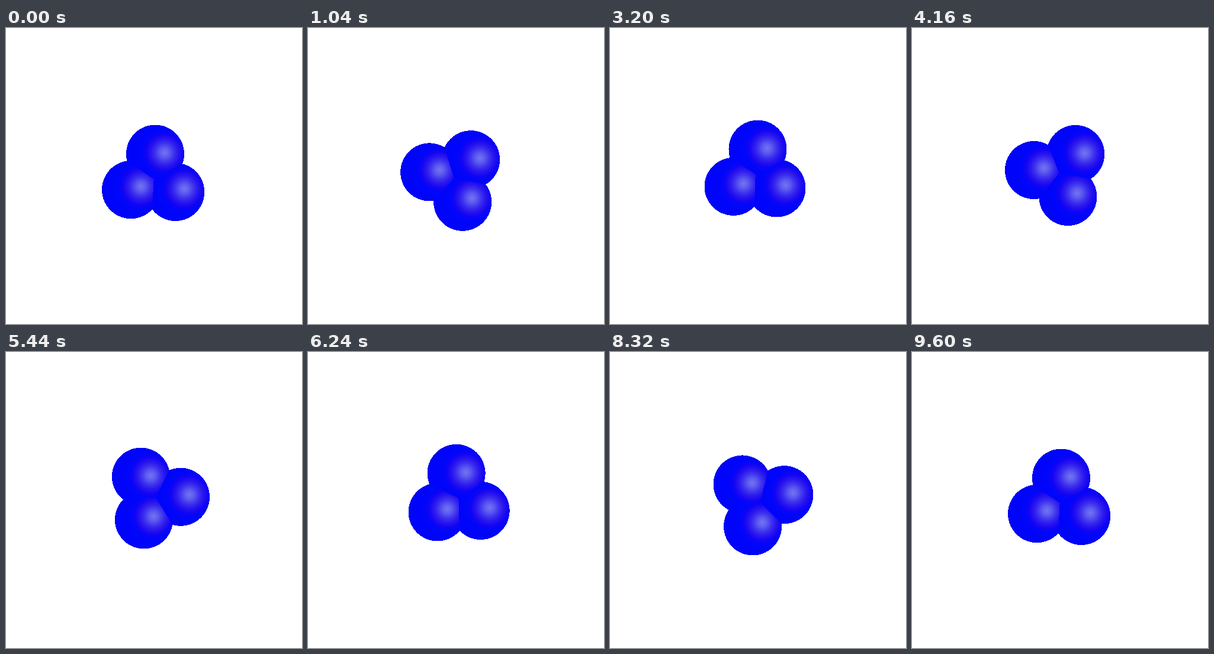
Recreate the animation shown at these times as an HTML page with a canvas. Size 500 by 500 pixels, loop 9.68 s.

```html
<!DOCTYPE html>
<html lang="en">
<head>
<meta charset="utf-8">
<title>Rotating spheres</title>
<style>
  html, body { margin: 0; height: 100%; overflow: hidden; background: #fff; }
  canvas { display: block; }
</style>
</head>
<body>
<canvas width="500" height="500"></canvas>
<script>
const ctx = document.querySelector('canvas').getContext('2d');
const SIZE = 500, CENTER = 250, RADIUS = 49;
const STEP_MS = 80, STEPS = 121, DEGREES_PER_STEP = 3;
const LEFT = 150, SPAN = 200;

// Sphere centres relative to the pivot, at angle zero
const spheres = [[2, -37.4], [-39, 23.1], [36.2, 27]];

// Distance from the highlight, then r, g, b
const shades = [
  [0, 116, 116, 240], [8, 92, 90, 240], [16, 62, 50, 238],
  [23, 42, 22, 238], [31, 18, 4, 244], [38, 0, 6, 250], [100, 0, 0, 250]
];

function shade(distance) {
  const i = shades.findIndex(s => s[0] > distance);
  const a = shades[i - 1], b = shades[i];
  const k = (distance - a[0]) / (b[0] - a[0]);
  return a.slice(1).map((c, j) => c + (b[j + 1] - c) * k);
}
const ramp = Array.from({ length: 400 }, (_, i) => shade(i / 4));

const image = ctx.createImageData(SPAN, SPAN);

function draw(step) {
  const angle = step * DEGREES_PER_STEP * Math.PI / 180;
  const cos = Math.cos(angle), sin = Math.sin(angle);
  const placed = spheres.map(([x, y]) => {
    const dx = x * cos - y * sin, dy = x * sin + y * cos;
    return {
      x: CENTER + dx, y: CENTER + dy,
      // The light is near, so the highlight shifts with position
      lightX: CENTER + dx * 0.975 + 16, lightY: CENTER + dy * 0.945 - 4
    };
  });

  image.data.fill(255);
  for (let row = 0; row < SPAN; row++) {
    for (let col = 0; col < SPAN; col++) {
      const x = LEFT + col + 0.5, y = LEFT + row + 0.5;
      // Equal spheres at equal depth: the nearest centre is in front
      let front = null, nearest = RADIUS;
      for (const s of placed) {
        const d = Math.hypot(x - s.x, y - s.y);
        if (d < nearest) { nearest = d; front = s; }
      }
      if (!front) continue;
      const distance = Math.hypot(x - front.lightX, y - front.lightY);
      const rim = nearest > RADIUS - 1.5 ? 0.95 : 1;
      const [r, g, b] = ramp[Math.floor(distance * 4)];
      const p = (row * SPAN + col) * 4;
      image.data[p] = r;
      image.data[p + 1] = g;
      image.data[p + 2] = b * rim;
    }
  }
  ctx.fillStyle = '#fff';
  ctx.fillRect(0, 0, SIZE, SIZE);
  ctx.putImageData(image, LEFT, LEFT);
}

const start = performance.now();
let shown = -1;
function tick() {
  const step = Math.floor((performance.now() - start) / STEP_MS) % STEPS;
  if (step !== shown) draw(shown = step);
  requestAnimationFrame(tick);
}
tick();
</script>
</body>
</html>
```
